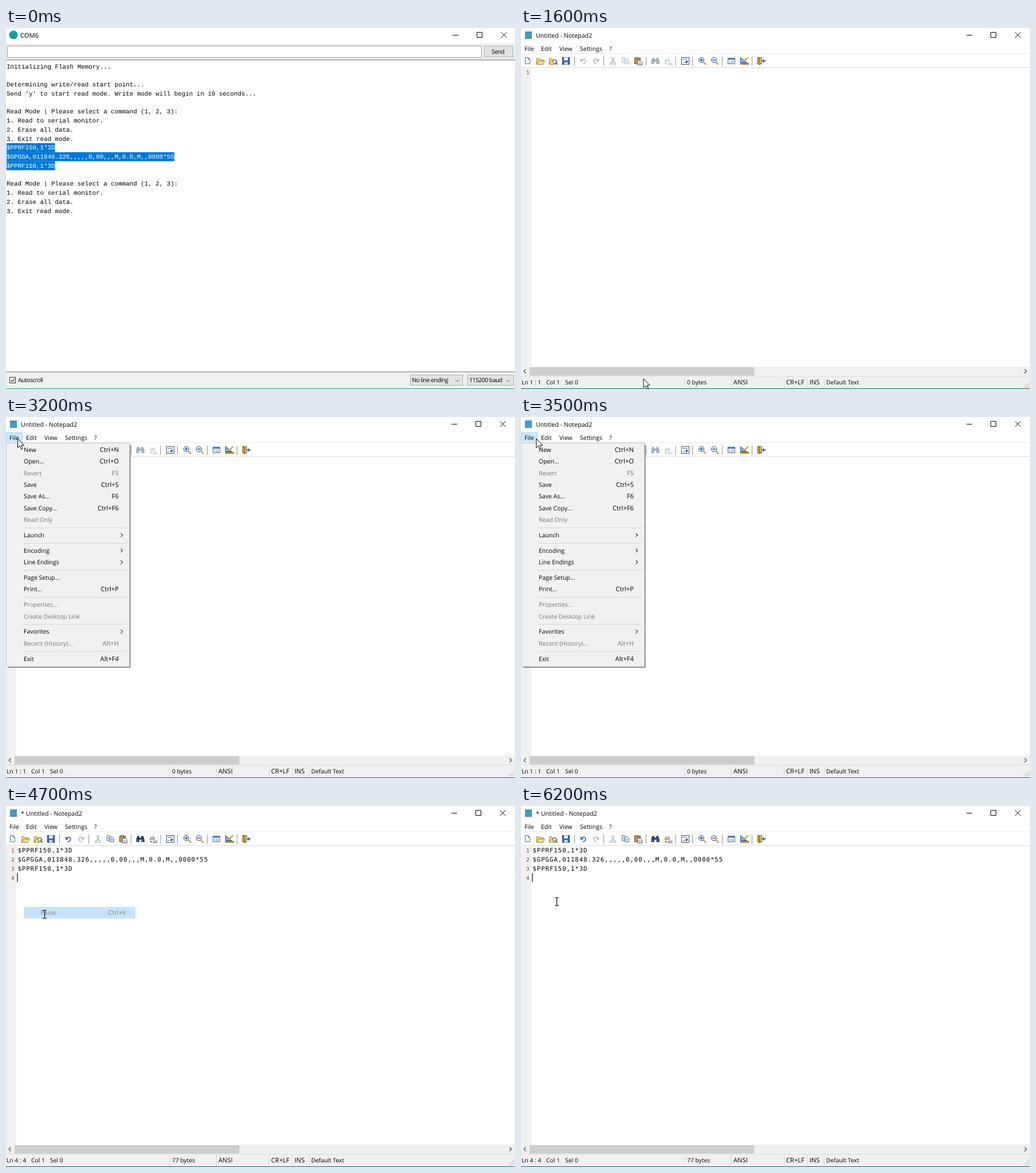
Write an HTML page that moves like this. It is 889 by 630 pixels and loops after 6300 ms.

```html
<!DOCTYPE html>
<html lang="en">
<head>
<meta charset="utf-8">
<title>Serial log to editor</title>
<style>
html, body { margin: 0; width: 100%; height: 100%; overflow: hidden; background: #fff; }
svg { display: block; width: 889px; height: 630px; }
text { font-family: "Open Sans", "Noto Sans", sans-serif; font-size: 10.5px; white-space: pre; text-rendering: geometricPrecision; fill: #000; }
.title { font-size: 10.7px; }
.java { font-size: 10.4px; letter-spacing: -.5px; }
.mono { font: 10.85px "Liberation Mono", monospace; }
.code { font: 10.7px "DejaVu Sans Mono", monospace; letter-spacing: .96px; }
.num { font: 9.3px "DejaVu Sans Mono", monospace; fill: #943434; }
.status { font-size: 10.3px; }
.caps { font-size: 11.2px; }
.key { font-size: 11.2px; text-anchor: end; }
.off { fill: #757575; }
.white { fill: #fff; }
.ctl { fill: none; stroke: #000; }
.inactive .title { fill: #999; }
.inactive .ctl { stroke: #999; }
</style>
</head>
<body>
<svg id="stage" viewBox="0 0 889 630"></svg>
<script>
const LOOP = 6300, STEP = 100;
const MODE = ['Read Mode | Please select a command (1, 2, 3):', '1. Read to serial monitor.',
  '2. Erase all data.', '3. Exit read mode.'];
const DATA = ['$PPRF150,1*3D', '$GPGGA,011848.326,,,,,0,00,,,M,0.0,M,,0000*55', '$PPRF150,1*3D'];
const LOG = ['Initializing Flash Memory...', '', 'Determining write/read start point...',
  "Send 'y' to start read mode. Write mode will begin in 10 seconds...", '',
  ...MODE, ...DATA, '', ...MODE];

// Leading "~" marks a disabled entry, "-" a separator, ">" a submenu.
const FILE = ['New|Ctrl+N', 'Open...|Ctrl+O', '~Revert|F5', 'Save|Ctrl+S', 'Save As...|F6',
  'Save Copy...|Ctrl+F6', '~Read Only', '-', 'Launch|>', '-', 'Encoding|>', 'Line Endings|>', '-',
  'Page Setup...', 'Print...|Ctrl+P', '-', '~Properties...', '~Create Desktop Link', '-',
  'Favorites|>', '~Recent (History)...|Alt+H', '-', 'Exit|Alt+F4'];
const EDIT = ['~Undo|Ctrl+Z', '~Redo|Ctrl+Y', '-', '~Cut|Ctrl+X', '~Copy|Ctrl+C', '~Copy All|Alt+C',
  '~Copy Add|Ctrl+E', 'Paste|Ctrl+V', 'Swap|Ctrl+K', '~Clear|Del', 'Clear Clipboard', 'Select All|Ctrl+A',
  '-', 'Lines|>', 'Block|>', 'Convert|>', 'Insert|>', 'Special|>', '-', '~Find...|Ctrl+F',
  '~Save Find Text|Alt+F3', '~Find Next|F3', '~Find Previous|Shift+F3', '~Replace...|Ctrl+H',
  '~Replace Next|F4', 'Goto...|Ctrl+G'];

const esc = s => s.replace(/&/g, '&amp;').replace(/</g, '&lt;');
const text = (x, y, s, c = '', id = '') => `<text x="${x}" y="${y}" class="${c}" id="${id}">${esc(s)}</text>`;
const rect = (x, y, w, h, fill, stroke = 'none', extra = '') =>
  `<rect x="${x}" y="${y}" width="${w}" height="${h}" fill="${fill}" stroke="${stroke}" ${extra}/>`;
const path = (d, stroke = '#000', fill = 'none', w = 1) =>
  `<path d="${d}" stroke="${stroke}" fill="${fill}" stroke-width="${w}"/>`;
const group = (id, body, extra = '') => `<g id="${id}" ${extra}>${body}</g>`;
const at = (x, y, body) => `<g transform="translate(${x} ${y})">${body}</g>`;

const controls = x => `<path class="ctl" d="M${x} 12.5h10M${x + 42.5} 7.5h9v9h-9zM${x + 85} 7.5l9.5 9.5m0-9.5l-9.5 9.5"/>`;

function consoleWindow() {
  const combo = (x, w, s) => rect(x + .5, 605.5, w, 18, '#e3e3e3', '#adadad') +
    text(x + 3, 618, s, 'java') + path(`M${x + w - 12} 614l3.5 3.5l3.5-3.5`, '#444');
  const lines = LOG.map((s, i) => {
    const y = 70.6 + i * 15.75, on = i > 8 && i < 12;
    return (on ? rect(1, 201 + (i - 9) * 15.7, s.length * 6.51, 15.8, '#0078d7') : '') +
      text(1, y, s, on ? 'mono white' : 'mono');
  }).join('');
  return rect(0, 0, 889, 630, '#fff') + '<circle cx="13" cy="12" r="7.5" fill="#159aa2"/>' +
    text(25, 16.5, 'COM6', 'title caps') + controls(780) +
    rect(0, 27, 889, 28, '#f0f0f0') + rect(0, 55, 889, 1.3, '#8c8c8c') +
    rect(2.5, 31.5, 828, 20, '#fff', '#9a9a9a') +
    rect(835.5, 31.5, 50, 19, '#e1e1e1', '#adadad') + text(848, 45, 'Send', 'java') + lines +
    rect(0, 599.5, 889, 1.3, '#8c8c8c') + rect(0, 601, 889, 28, '#f0f0f0') +
    rect(6.5, 609.5, 10, 10, '#fff', '#333') + path('M8.5 614.5l2.4 2.6l4.4-5.2', '#111', 'none', 1.1) +
    text(21, 618, 'Autoscroll', 'java') + combo(706, 91, 'No line ending') + combo(806, 80, '115200 baud') +
    rect(0, 629, 889, 1, '#2f8f98', 'none', 'id="edge"');
}

function icons() {
  const page = (x, y, c) => path(`M${x} ${y}h5l3 3v8h-8z`, c, '#fff') + path(`M${x + 5} ${y}v3h3`, c);
  const lens = sign => path('M2 2l4.5 4.5', '#c79a3c', 'none', 2.2) +
    `<circle cx="-1.5" cy="-1.5" r="4.6" fill="#dcecfb" stroke="#35507c"/>` + path(sign, '#1f50a0', 'none', 1.4);
  const folder = path('M-7 6v-10h4l1.5 2h6v2', '#a9802a', '#f5d77c') + path('M-7 6l3-6h11l-3 6z', '#a9802a', '#fae08c');
  const binoc = path('M-5-5h3v3h4v-3h3l2 6v4h-5v-4h-4v4h-5v-4z', 'currentColor', 'currentColor', .6) +
    path('M-5.5 1v2.5M3.5 1v2.5', '#dfe8f5');
  const undo = path('M-4-3.5v4h4M-3.5 0C-1-4.5 5-4 4.2 0.5C4 3 2 4.5-.5 5', 'currentColor', 'none', 1.6);
  const sheet = (x, y) => path(`M${x} ${y}h4l3 3v6h-7z`, 'currentColor', '#fff') +
    path(`M${x + 2} ${y + 4}h3m-3 2h3`, 'currentColor');
  const copy = sheet(-6, -6) + sheet(-1, -4);
  const letters = (x, y, s) => `<text x="${x}" y="${y}" style="font-size:8.5px;fill:currentColor">${s}</text>`;
  const swap = letters(-7, 1, 'ab') + letters(-1, 7, 'ac') + path('M-5 3v2h3', 'currentColor');
  const live = (body, dim, lit) => `<g class="live" data-dim="${dim}" data-lit="${lit}" style="color:${dim}">${body}</g>`;
  const ring = x => `<circle cx="${x}" cy="4.5" r="2" fill="none" stroke="#a0a8b2"/>`;
  const list = [
    [11, page(-4, -6, '#526a8c')],
    [34, folder],
    [56, folder + '<circle cx="2" cy="1" r="3.2" fill="#e3f0fb" stroke="#444"/>' + path('M4.3 3.3l3 3', '#444', 'none', 1.6)],
    [78, rect(-6, -6, 12, 12, '#3568b8', '#1e3f78') + rect(-3.5, -6, 7, 5, '#eef4fb') + rect(-3, 2, 6, 4, '#d4dce8')],
    [108, live(undo, '#a9b5c6', '#2e62b4')],
    [131, `<g transform="scale(-1 1)" style="color:#adb8c5">${undo}</g>`],
    [160, path('M-2-6l4 9M2-6l-4 9', '#a0a8b2', 'none', 1.2) + ring(-3) + ring(3)],
    [182, live(copy, '#a9b2be', '#48699c')],
    [204, rect(-6, -5, 10, 10, '#c9963a', '#73501a') + rect(-4, -6, 5, 2, '#ddd', '#555') +
      path('M-1-1h5l3 3v5h-8z', '#41567a', '#fff') + path('M1 3h4m-4 2h4', '#6c86b0')],
    [234, live(binoc, '#a0abb8', '#263f68')],
    [257, live(swap, '#9aa0a8', '#222')],
    [286, rect(-6, -6, 13, 12, '#fff', '#3e4c62') + path('M-4-3h8M-4 3h3', '#536b95') +
      path('M4-1v3H1m2-2L1 2l2 2', '#1b4d98', 'none', 1.3)],
    [316, lens('M-4-1.5h5M-1.5-4v5')],
    [338, lens('M-4-1.5h5')],
    [367, rect(-6, -5, 12, 10, '#fff', '#496a9b') + rect(-6, -5, 12, 3, '#4d82c7') +
      path('M-4 1h2m1 0h5M-4 3h2m1 0h5', '#728bb0')],
    [390, path('M-7-6v9h11z', '#285aa0', '#7db1e4') + path('M-2 2l8-8', '#d39a2a', 'none', 2.4) +
      rect(-7, 4, 14, 2, '#e1b53e', '#8d6719')],
    [419, path('M-6-6h7v11h-7z', '#705821', '#f0d98a') + path('M-6-6l4 2v11l-4-2z', '#705821', '#c89d36') +
      path('M8 0H3m2-2.5L2.5 0l2.5 2.5', '#1d4c93', 'none', 1.4)]
  ];
  return list.map(([x, body]) => at(x + .5, 57.5, body)).join('') +
    [93, 144, 218, 269.5, 299, 351, 403].map(x => rect(x, 50, 1, 16, '#8e8e8e')).join('');
}

function editorWindow() {
  const menus = [[6, 'File'], [35, 'Edit'], [67, 'View'], [103, 'Settings'], [154, '?']];
  const num = (n, i) => text(9, 81.3 + i * 15.75, String(n), 'num');
  const grip = [[886, 619], [886, 622.5], [882.5, 622.5], [886, 626], [882.5, 626], [879, 626]];
  return rect(0, 0, 889, 630, '#fff') + rect(7, 6, 12, 13, '#4698c4') +
    text(26, 16.8, 'Untitled - Notepad2', 'title', 'name') + controls(778) +
    group('tabFile', rect(.5, 27.5, 28, 17, '#cce8ff', '#99d1ff')) +
    group('tabEdit', rect(29.5, 27.5, 30, 17, '#cce8ff', '#99d1ff')) +
    menus.map(([x, s]) => text(x, 39.7, s)).join('') + rect(0, 44, 889, 1, '#ececec') +
    group('hotNew', rect(.5, 47.5, 21, 19, '#e8f4fd', '#cfe6f8')) + icons() +
    rect(0, 68.5, 889, 1, '#d6d6d6') + rect(0, 70, 18, 521, '#f0f0f0') + num(1, 0) +
    group('pasted', [2, 3, 4].map((n, i) => num(n, i + 1)).join('') +
      DATA.map((s, i) => text(20.4, 81.3 + i * 15.75, s, 'code')).join('')) +
    rect(19.4, 117, 1.2, 15.5, '#000', 'none', 'id="caret"') +
    rect(0, 591, 889, 16, '#f0f0f0') + rect(15, 592, 392.5, 14.5, '#cdcdcd') +
    path('M8.5 595.5L5 599l3.5 3.5M879.5 595.5L883 599l-3.5 3.5', '#444', 'none', 1.2) +
    rect(0, 607, 889, 22, '#f0f0f0') + rect(0, 607, 889, 1, '#dcdcdc') +
    [285, 367, 459, 499.5, 529.5].map(x => rect(x, 609, 1, 19, '#d7d7d7')).join('') +
    text(1, 622.4, 'Ln 1 : 1', 'status', 'line') + text(44, 622.4, 'Col 1', 'status') + text(77, 622.4, 'Sel 0', 'status') +
    text(290, 622.4, '0 bytes', 'status', 'bytes') + text(371, 622.4, 'ANSI', 'caps') +
    text(463, 622.4, 'CR+LF', 'caps') + text(504, 622.4, 'INS', 'caps') + text(533, 622.4, 'Default Text', 'status') +
    grip.map(([x, y]) => rect(x - 1, y - 1, 1.8, 1.8, '#bcbcbc')).join('') + rect(0, 629, 889, 1, '#105a66');
}

function layout(items) {
  let y = 57;
  return items.map(s => {
    if (s === '-') { y += 6.4; return { sep: true, y: y - 13.2 }; }
    const [label, key = ''] = s.replace('~', '').split('|');
    const row = { label, key, off: s[0] === '~', y };
    y += 20.4;
    return row;
  });
}

const rowText = (x, right, r) => {
  const c = r.off ? 'off' : '';
  return text(x + 31, r.y + 3.8, r.label, c) + (r.key === '>'
    ? path(`M${right - 15.5} ${r.y - 3.2}l3.2 3.2l-3.2 3.2`, '#333', 'none', 1.1)
    : text(right - 19, r.y + 3.8, r.key, 'key ' + c));
};

const menu = (id, x, w, h, rows) => group(id,
  rect(x + 5, 49, w - 2.6, h - 2, '#000', 'none', 'opacity=".13"') +
  rect(x + 4, 48, w - 2.8, h - 1.6, '#666', 'none', 'opacity=".75"') +
  rect(x + .5, 45.5, w - 1, h - 1, '#f1f1f1', '#c6c6c6') +
  (id === 'editMenu' ? rect(31, 0, 195, 20.4, '#e6e6e6', 'none', 'id="hover"') : '') +
  rows.map(r => r.sep ? rect(x + 29, r.y, w - 33, 1, '#d5d5d5') : rowText(x, x + w, r)).join(''));

const editRows = layout(EDIT);
const paste = editRows.find(r => r.label === 'Paste');
const stage = document.getElementById('stage');
stage.innerHTML = group('console', consoleWindow()) + group('editor', editorWindow() +
  menu('fileMenu', 0, 216, 391, layout(FILE)) + menu('editMenu', 29.5, 199.5, 494, editRows) +
  group('ghost', rect(31, 176, 195, 20.4, '#91c9f7') + rowText(29.5, 229, paste)) +
  group('arrow', path('M0 0V15.6L3.6 12.3L6.1 18.2L8.6 17.1L6.1 11.4H11Z', '#000', '#fff')) +
  group('beam', path('M-3.5-7h2.5l1 1l1-1h2.5M0-6v12M-3.5 7h2.5l1-1l1 1h2.5', '#000', 'none', 1.1)));

const $ = id => document.getElementById(id);
const show = (id, on) => $(id).style.display = on ? '' : 'none';
const fade = (id, v) => { show(id, v > 0); $(id).style.opacity = v; };

// time, x, y
const ARROW = [[1600, 214, 612], [1700, 186, 500], [1800, 145, 358], [1900, 100, 230], [2000, 58, 130],
  [2200, 20, 60], [2400, 20, 52], [2600, 21, 43.5], [2800, 20.5, 38], [3400, 20.5, 38], [3600, 33, 38],
  [3800, 45, 42], [3900, 49, 66], [4100, 58.5, 155], [4300, 66, 182], [4400, 67, 187], [4700, 67, 187]];
const BEAM = [[4600, 67.5, 189], [5200, 67.5, 189], [5300, 64.5, 175], [5400, 62.5, 166], [5500, 62.5, 166], [5600, 62.5, 167]];

function along(track, t) {
  const i = track.findIndex(k => k[0] > t);
  if (i < 1) return track[i < 0 ? track.length - 1 : 0].slice(1);
  const [a, b] = [track[i - 1], track[i]], p = (t - a[0]) / (b[0] - a[0]);
  return [a[1] + (b[1] - a[1]) * p, a[2] + (b[2] - a[2]) * p];
}
const move = (id, [x, y]) => $(id).setAttribute('transform', `translate(${x} ${y})`);

function draw(ms) {
  const t = Math.floor(ms / STEP) * STEP, between = (a, b) => t >= a && t < b;
  show('console', t < 1200);
  show('editor', t >= 1200);
  $('console').setAttribute('class', t >= 1100 ? 'inactive' : '');
  $('edge').setAttribute('fill', t >= 1100 ? '#5d5a55' : '#2f8f98');

  const done = t >= 4600, tip = along(ARROW, t);
  $('name').textContent = (done ? '* ' : '') + 'Untitled - Notepad2';
  $('line').textContent = done ? 'Ln 4 : 4' : 'Ln 1 : 1';
  $('bytes').textContent = done ? '77 bytes' : '0 bytes';
  show('pasted', done);
  for (const g of document.querySelectorAll('.live')) g.style.color = done ? g.dataset.lit : g.dataset.dim;
  show('caret', between(4600, 4900) || between(5300, 5800) || t >= 6200);

  show('hotNew', between(2300, 2700));
  show('tabFile', between(2700, 3600));
  show('tabEdit', between(3600, 4600));
  fade('fileMenu', between(2800, 3600) ? Math.min(1, (t - 2700) / 300) : 0);
  show('editMenu', between(3600, 4600));
  const row = editRows.find(r => !r.sep && Math.abs(tip[1] - r.y) <= 10.2);
  show('hover', !!row && t >= 3900);
  if (row) {
    $('hover').setAttribute('y', row.y - 10.2);
    $('hover').setAttribute('fill', row.off ? '#e6e6e6' : '#91c9f7');
  }
  fade('ghost', between(4600, 4900) ? [1, .5, .15][(t - 4600) / STEP] : 0);

  show('arrow', between(1600, 4700));
  show('beam', t >= 4700);
  move('arrow', tip);
  move('beam', along(BEAM, t));
}

const start = performance.now();
function tick() {
  draw((performance.now() - start) % LOOP);
  requestAnimationFrame(tick);
}
tick();
</script>
</body>
</html>
```
